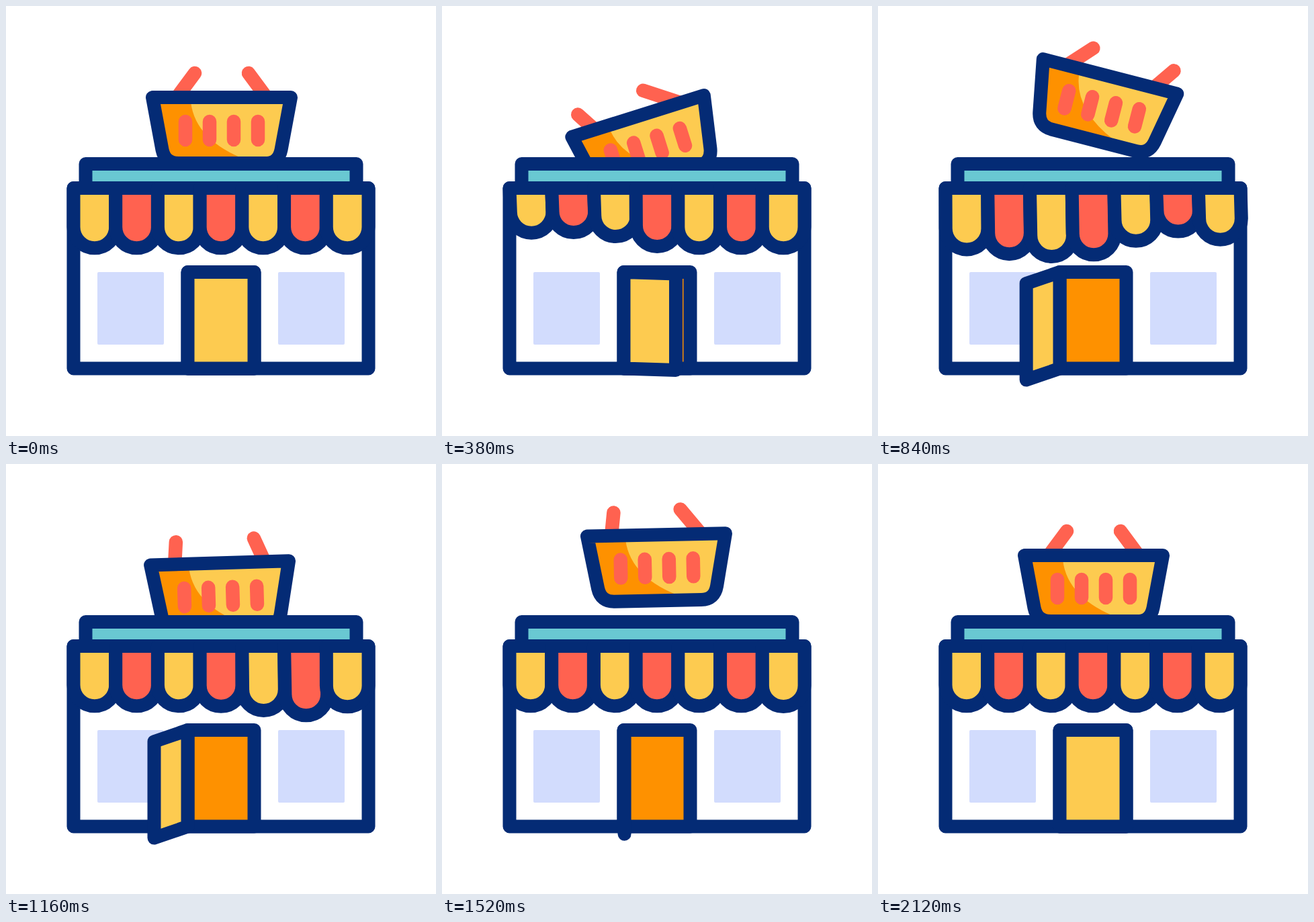
These frames come from a looping animation (640x640 px, 2400 ms). An HTML page:

```html
<!DOCTYPE html>
<html lang="en">
<head>
<meta charset="utf-8">
<title>Shop</title>
<style>
  html, body { margin: 0; width: 100%; height: 100%; overflow: hidden; background: #fff; }
  svg { display: block; width: 100vw; height: 100vh; }
  .line { stroke: #042b75; stroke-width: 20; stroke-linejoin: round; stroke-linecap: round; }
  .red { stroke: #ff6250; stroke-width: 20.5; stroke-linecap: round; fill: none; }
  .none { fill: none; }
  .yellow { fill: #fdcb50; }
  .coral { fill: #ff6250; }
  .orange { fill: #fe9100; }
  .teal { fill: #69c8d2; }
  .glass { fill: #d2dcfd; }
  .white { fill: #fff; }
</style>
</head>
<body>
<svg viewBox="0 0 640 640">
  <g id="basket">
    <path id="handleL" class="red"/>
    <path id="handleR" class="red"/>
    <path class="yellow" d="M218 136H424L409.5 214Q405.5 234 386 234H257Q236.5 234 232.5 214Z"/>
    <path class="orange" d="M218 136H274.5Q277 195 350 226V234H257Q236.5 234 232.5 214Z"/>
    <path class="red" d="M267 172V199M303 172V199M339 172V199M375 172V199"/>
    <path class="line none" d="M218 136H424L409.5 214Q405.5 234 386 234H257Q236.5 234 232.5 214Z"/>
  </g>
  <rect class="line teal" x="118.5" y="235" width="403" height="36"/>
  <rect class="line white" x="100.5" y="271" width="439" height="268.5"/>
  <rect class="glass" x="136" y="396" width="99" height="108" rx="2"/>
  <rect class="glass" x="405" y="396" width="99" height="108" rx="2"/>
  <g id="awning"></g>
  <rect class="line orange" x="270.5" y="396" width="99" height="143.5"/>
  <path id="door" class="line yellow"/>
</svg>
<script>
const LOOP = 2400;
const KEY_TIMES = [0, 360, 720, 1080, 1440, 1800, 2120];
const MOTION = {
  lift: [0, 24, -52, 18, -38, 24, 0],
  tilt: [0, -17.8, 20, -1.7, -1.8, 3.4, 0],
  leftX: [281, 236, 296, 257, 255, 281, 281],
  leftY: [100, 107, 101, 103, 102, 100, 100],
  rightX: [361, 339, 423, 375, 357, 361, 361],
  rightY: [100, 102, 105, 101, 98.5, 100, 100]
};
const FLAP_STARTS = [45, 140, 200, 322, 430, 565, 695];
const FLAP_STEP = 290;
const FLAP_TIMES = [0, 1, 2, 3].map(i => i * FLAP_STEP);
const FLAP_DROP = [0, -25, 14, 0];
const FLAP_WIDTH = 439 / 7;

const byId = id => document.getElementById(id);
const clamp = u => Math.min(1, Math.max(0, u));
const sine = u => (1 - Math.cos(Math.PI * u)) / 2;
const cubic = u => u < 0.5 ? 4 * u ** 3 : 1 - 4 * (1 - u) ** 3;

function track(t, times, values) {
  const last = times.length - 1;
  if (t <= times[0]) return values[0];
  if (t >= times[last]) return values[last];
  const i = times.findIndex(time => time > t) - 1;
  const u = (t - times[i]) / (times[i + 1] - times[i]);
  return values[i] + (values[i + 1] - values[i]) * sine(u);
}

const flaps = FLAP_STARTS.map((_, i) => {
  const flap = document.createElementNS("http://www.w3.org/2000/svg", "path");
  flap.setAttribute("class", i % 2 ? "line coral" : "line yellow");
  return byId("awning").appendChild(flap);
});

function drawBasket(t) {
  const at = name => track(t, KEY_TIMES, MOTION[name]);
  byId("basket").setAttribute("transform",
    `translate(0 ${at("lift")}) rotate(${at("tilt")} 321 234)`);
  byId("handleL").setAttribute("d", `M254 136.5L${at("leftX")} ${at("leftY")}`);
  byId("handleR").setAttribute("d", `M388 136.5L${at("rightX")} ${at("rightY")}`);
}

function drawFlap(flap, i, t) {
  const drop = track(t - FLAP_STARTS[i], FLAP_TIMES, FLAP_DROP);
  const shift = 1.3 * Math.min(1, Math.abs(drop) / 12);
  const left = 100.5 + i * FLAP_WIDTH;
  const right = left + FLAP_WIDTH;
  const r = FLAP_WIDTH / 2;
  const y = 329 + drop;
  flap.setAttribute("d",
    `M${left} 271L${left + shift} ${y}A${r} ${r} 0 0 0 ${right + shift} ${y}L${right} 271Z`);
}

function drawDoor(t) {
  const open = cubic(clamp((t - 130) / 760)) - cubic(clamp((t - 1155) / 830));
  const x = 369.5 - 149 * open;
  const skew = 17.1 * open;
  byId("door").setAttribute("d",
    `M270.5 396L${x} ${396 + skew}V${539.5 + skew}L270.5 539.5Z`);
}

function render(t) {
  drawBasket(t);
  flaps.forEach((flap, i) => drawFlap(flap, i, t));
  drawDoor(t);
}

const start = performance.now();
function tick() {
  render((performance.now() - start) % LOOP);
  requestAnimationFrame(tick);
}
tick();
</script>
</body>
</html>
```
